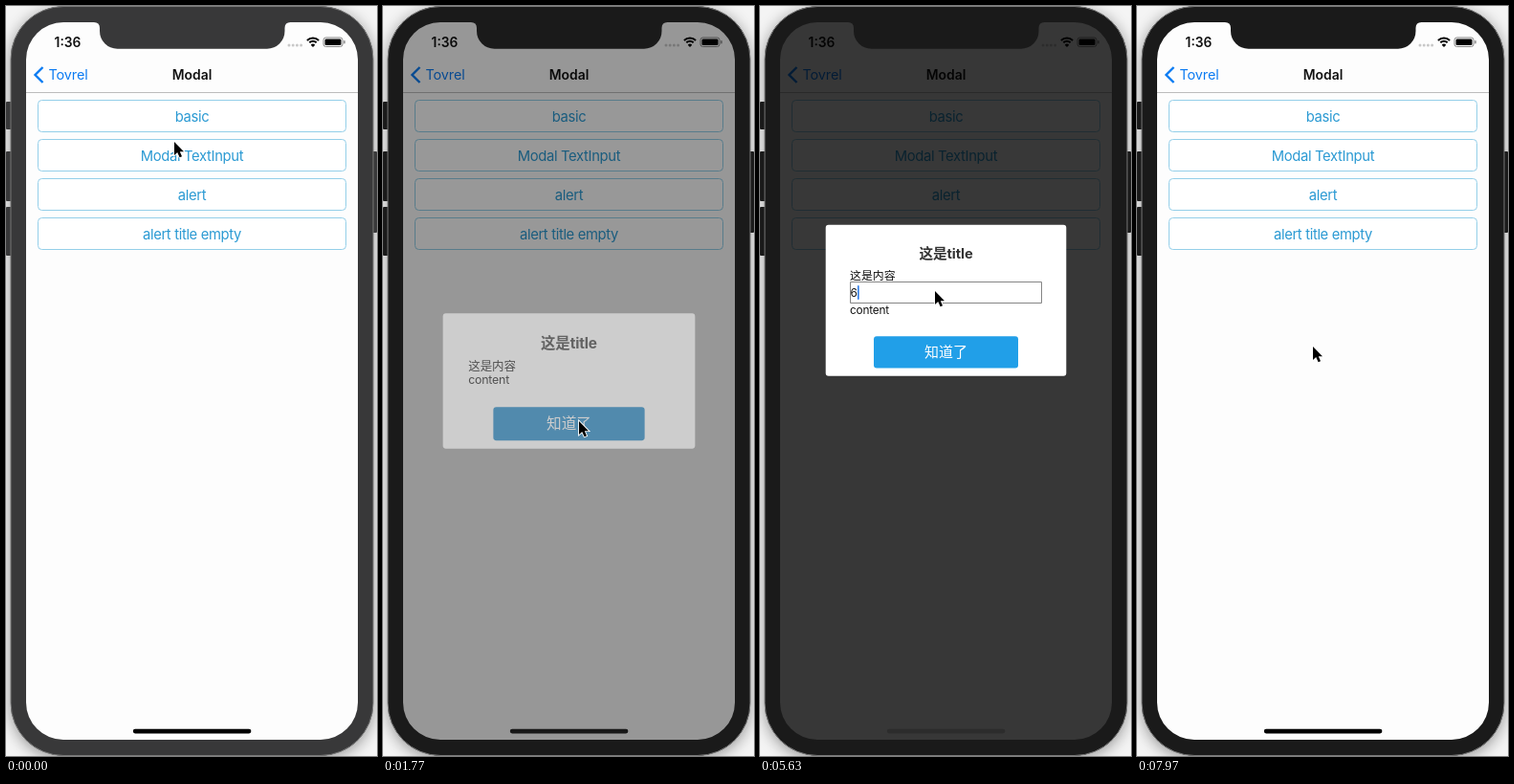
An HTML page with a canvas that plays this animation: 388 px wide and 784 px high, repeating every 8 s.

```html
<!DOCTYPE html>
<html lang="zh-CN">
<head>
<meta charset="utf-8">
<title>Modal demo</title>
<style>
html, body { margin: 0; width: 100%; height: 100%; overflow: hidden; background: #f4f4f4; }
canvas { display: block; }
</style>
</head>
<body>
<canvas id="stage" width="388" height="784"></canvas>
<script>
const screenCtx = document.getElementById('stage').getContext('2d');
const layer = document.createElement('canvas');
layer.width = 388;
layer.height = 784;
const layerCtx = layer.getContext('2d');
let ctx = screenCtx;

const LOOP = 8000;
const FONT = 'Inter, "Noto Sans CJK SC", "Noto Sans CJK", sans-serif';
const DIM = 0.78;

const clamp = v => Math.max(0, Math.min(1, v));
const ease = v => v * v * (3 - 2 * v);
const ramp = (t, from, to) => ease(clamp((t - from) / (to - from)));
const within = (t, from, to) => t >= from && t < to;

// Pointer stops: time, x, y
const pointerPath = [
  [0, 176, 142], [60, 176, 142], [330, 184, 116], [780, 184, 116],
  [1400, 205, 434], [1820, 205, 434], [2480, 183, 155], [2760, 183, 155],
  [3330, 214, 347], [3420, 214, 347], [3900, 183, 298], [6720, 183, 298],
  [7220, 184, 356], [LOOP, 184, 356]
];
const menu = [
  { label: 'basic', press: [400, 560] },
  { label: 'Modal TextInput', press: [2540, 2720] },
  { label: 'alert', press: [0, 0] },
  { label: 'alert title empty', press: [0, 0] }
];
const modals = [
  { y: 324.5, h: 135, open: 520, close: 1620, press: [1530, 1800] },
  { y: 228.7, h: 158, open: 2638, close: 7446, press: [7320, 7700], input: true }
];
const digits = '601933';
const keyTimes = [5520, 5900, 6070, 6270, 6470, 6640];

function box(x, y, w, h, r, fill, stroke) {
  ctx.beginPath();
  ctx.roundRect(x, y, w, h, r);
  if (fill) { ctx.fillStyle = fill; ctx.fill(); }
  if (stroke) { ctx.strokeStyle = stroke; ctx.lineWidth = 1; ctx.stroke(); }
}

function text(str, x, y, size, color, { weight = 400, align = 'left', spacing = 0 } = {}) {
  ctx.font = `${weight} ${size}px ${FONT}`;
  ctx.letterSpacing = spacing + 'px';
  ctx.textAlign = align;
  ctx.textBaseline = 'alphabetic';
  ctx.fillStyle = color;
  ctx.fillText(str, x, y);
}

function pointerAt(t) {
  const i = pointerPath.findIndex(p => p[0] > t);
  const [t0, x0, y0] = pointerPath[i - 1], [t1, x1, y1] = pointerPath[i];
  const k = ramp(t, t0, t1);
  return [x0 + (x1 - x0) * k, y0 + (y1 - y0) * k];
}

function drawBackdrop(shell) {
  ctx.fillStyle = '#f4f4f4';
  ctx.fillRect(0, 0, 388, 784);
  ctx.save();
  ctx.shadowColor = 'rgba(0,0,0,0.4)';
  ctx.shadowBlur = 16;
  ctx.shadowOffsetY = 3;
  box(5, 0.5, 379, 783, 55, shell);
  ctx.restore();
  for (const [x, y, h] of [[0, 100, 29], [0, 152, 52], [0, 210, 51], [382, 152, 85]])
    box(x, y, 6, h, 1, shell);
  ctx.fillStyle = '#fdfdfd';
  ctx.fillRect(21, 17, 347, 750);
}

// The frame goes over the screen, so the dimmed corners stay clean.
function drawBezel(shell) {
  ctx.beginPath();
  ctx.roundRect(5, 0.5, 379, 783, 55);
  ctx.roundRect(21, 17, 347, 750, 39);
  ctx.fillStyle = shell;
  ctx.fill('evenodd');
  box(5, 0.5, 379, 783, 55, null, '#777');
  ctx.fillStyle = shell;
  ctx.fill(new Path2D('M92 16 V17 Q98 17 98 23 V26 A18.5 18.5 0 0 0 116.5 44.7 H273 A18.5 18.5 0 0 0 291.5 26 V23 Q291.5 17 297.5 17 V16 Z'));
}

function drawStatus() {
  text('1:36', 64.5, 43, 13.8, '#111', { weight: 600, align: 'center' });
  for (let i = 0; i < 4; i++) box(294.5 + i * 4.2, 39.5, 3, 3, 1.5, '#c8c8c8');
  ctx.strokeStyle = '#000';
  ctx.lineWidth = 2;
  for (const r of [5.2, 8.6]) {
    ctx.beginPath();
    ctx.arc(321, 42, r, -Math.PI * 0.75, -Math.PI * 0.25);
    ctx.stroke();
  }
  ctx.beginPath();
  ctx.moveTo(321, 43);
  ctx.arc(321, 43, 3.2, -Math.PI * 0.75, -Math.PI * 0.25);
  ctx.fillStyle = '#000';
  ctx.fill();
  box(332, 33, 20, 9.5, 2.5, null, '#888');
  box(333.5, 34.5, 17, 6.5, 1.3, '#000');
  box(353.2, 36, 1.5, 3.5, 0.7, '#888');
}

function drawNav() {
  ctx.strokeStyle = '#0b7bf2';
  ctx.lineWidth = 2.4;
  ctx.stroke(new Path2D('M38.5 64 L30.5 72 L38.5 80'));
  text('Tovrel', 44.5, 77, 14.4, '#0b7bf2', { spacing: -0.1 });
  text('Modal', 194.5, 77, 13.9, '#111', { weight: 600, align: 'center' });
  ctx.fillStyle = '#bcbcbc';
  ctx.fillRect(21, 90, 347, 1);
}

function drawMenu(t) {
  menu.forEach(({ label, press }, i) => {
    const y = 98 + i * 41, down = within(t, ...press);
    box(33.5, y + 0.5, 322, 33, 4, down ? '#eff5f8' : '#fff', '#94cfe9');
    text(label, 194.5, y + 22.5, 14.8, down ? '#147fbd' : '#2b9ad3', { align: 'center', spacing: -0.35 });
  });
}

function caretAlpha(t) {
  if (!within(t, 4030, 7300)) return 0;
  const blink = (a, b, c, d) => 1 - ramp(t, a, b) + ramp(t, c, d);
  return t < 4850 ? blink(4200, 4340, 4530, 4670) : blink(5000, 5120, 5180, 5300);
}

function drawInput(t) {
  const typed = digits.slice(0, keyTimes.filter(k => k <= t).length);
  box(94.5, 288.5, 200, 22, 0, null, '#858585');
  text(typed || '文本框', 94.5, 303.7, 11.9, typed ? '#111' : '#c2c2c6', { spacing: typed ? -0.35 : 0 });
  const end = typed ? ctx.measureText(typed).width : 0;
  ctx.save();
  ctx.globalAlpha = caretAlpha(t);
  box(95 + end, 292, 1.6, 15, 0.8, '#2a7bea');
  ctx.restore();
}

function drawDialog(t, m) {
  const cx = 194.5, by = m.y + m.h - 41.5;
  box(68.7, m.y, 251.6, m.h, 3, '#fff');
  text('这是title', cx, m.y + 35.5, 14.7, '#333', { weight: 700, align: 'center', spacing: -0.1 });
  text('这是内容', 94, m.y + 57, 11.9, '#111');
  if (m.input) drawInput(t);
  text('content', 94, m.y + (m.input ? 93.5 : 70), 11.8, '#111', { spacing: -0.2 });
  box(119, by, 151, 33.3, 3, within(t, ...m.press) ? '#117fc2' : '#219fe8');
  text('知道了', cx, by + 22, 15, '#fff', { weight: 300, align: 'center' });
}

function drawModal(t, m) {
  const closing = ramp(t, m.close, m.close + 310);
  const shown = ramp(t, m.open, m.open + 320) * (1 - closing);
  if (!shown) return;

  ctx.fillStyle = `rgba(0,0,0,${DIM * shown})`;
  ctx.fillRect(21, 17, 347, 750);

  // The dialog fades as one piece.
  const cx = 194.5, cy = m.y + m.h / 2, scale = 1 + 0.1 * closing;
  ctx = layerCtx;
  ctx.clearRect(0, 0, 388, 784);
  ctx.save();
  ctx.translate(cx, cy);
  ctx.scale(scale, scale);
  ctx.translate(-cx, -cy);
  drawDialog(t, m);
  ctx.restore();

  ctx = screenCtx;
  ctx.globalAlpha = shown;
  ctx.drawImage(layer, 0, 0);
  ctx.globalAlpha = 1;
}

function drawHomeBar(t) {
  ctx.save();
  ctx.globalAlpha = 1 - 0.3 * ramp(t, 600, 900) + 0.3 * ramp(t, 1650, 1900)
    - 0.8 * ramp(t, 2750, 3200) + 0.8 * ramp(t, 7300, 7600);
  box(132.8, 755.8, 123.6, 4.6, 2.3, '#000');
  ctx.restore();
}

function drawPointer(t) {
  const arrow = new Path2D('M0 0 V14 L3.2 11 L5.6 16.2 L8 15.2 L5.8 10.2 H10 Z');
  ctx.save();
  ctx.translate(...pointerAt(t));
  ctx.strokeStyle = '#fff';
  ctx.lineWidth = 1.8;
  ctx.stroke(arrow);
  ctx.fillStyle = '#000';
  ctx.fill(arrow);
  ctx.restore();
}

function draw(t) {
  // The shell darkens once the window becomes active.
  const shell = t < 390 ? '#383839' : '#1a1a1a';
  drawBackdrop(shell);
  drawStatus();
  drawNav();
  drawMenu(t);
  modals.forEach(m => drawModal(t, m));
  drawHomeBar(t);
  drawBezel(shell);
  drawPointer(t);
}

const start = performance.now();
function tick() {
  draw((performance.now() - start) % LOOP);
  requestAnimationFrame(tick);
}
tick();
</script>
</body>
</html>
```
